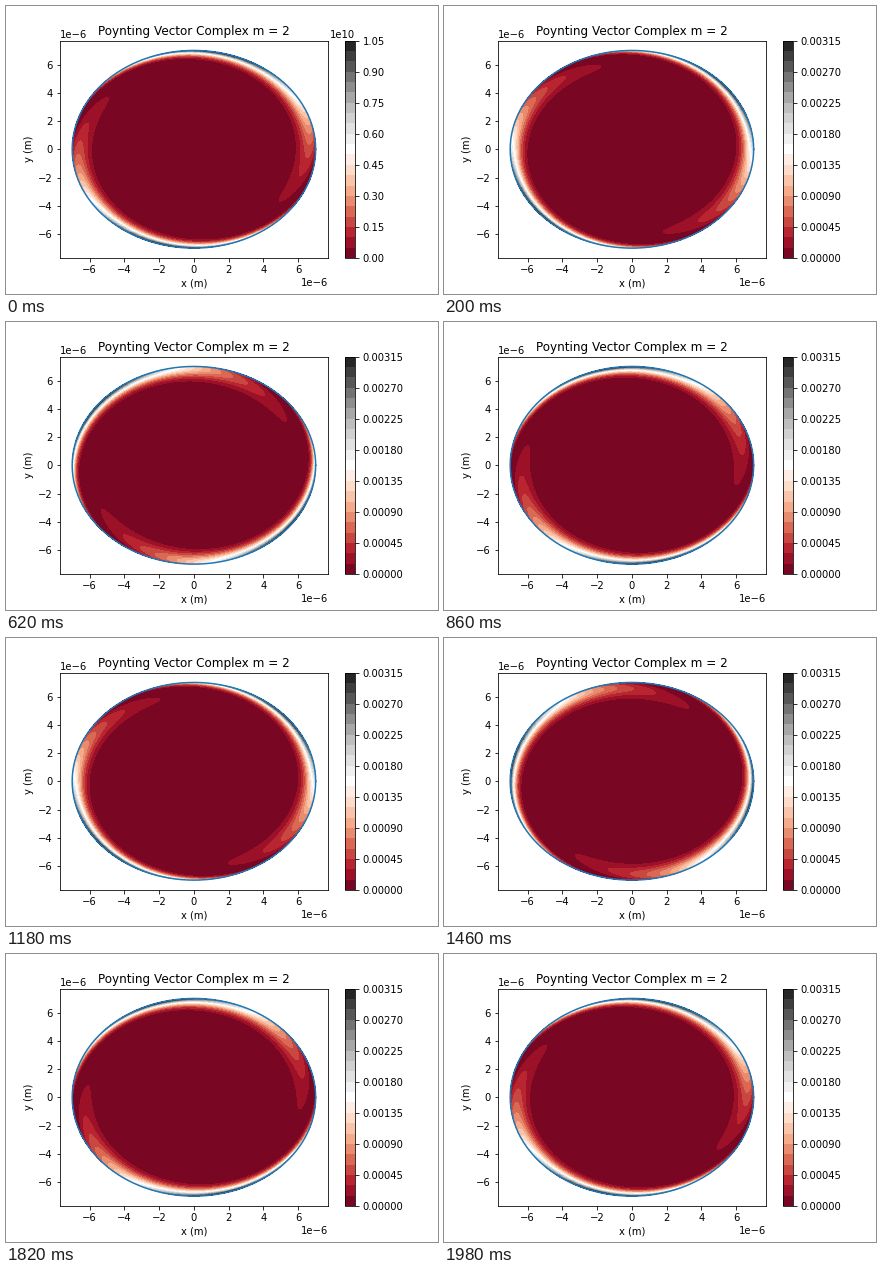
A matplotlib script that plays this animation: 432 by 288 pixels, repeating every 2 s.

```python
import numpy as np
import matplotlib.pyplot as plt
from matplotlib.animation import FuncAnimation

FRAMES, INTERVAL = 100, 20
R = 7e-6                    # cylinder radius (m)
DECAY, TWIST = 2.7e6, 1.35e6  # intensity decay and phase lag per metre of depth
PHASE = np.radians(75.3)    # angle of the rim maximum at the start
PEAK = 0.985
LEVELS = np.linspace(0, 1, 22)

plt.rcParams.update({"font.family": "DejaVu Sans", "font.size": 10})

phi = np.linspace(0, 2 * np.pi, 241)
r = np.append(0, np.linspace(4.5e-6, R, 100))
P, RR = np.meshgrid(phi, r)
X, Y = RR * np.cos(P), RR * np.sin(P)
depth = R - RR

fig = plt.figure(figsize=(6, 4), dpi=72, facecolor="white")
ax = fig.add_axes([0.125, 0.125, 0.62, 0.755])


def field(i):
    turn = 2 * np.pi * i / (FRAMES - 1)
    wave = np.cos(P - PHASE + turn + TWIST * depth)
    return PEAK * np.exp(-DECAY * depth) * wave ** 2


def draw_field(i, scale=1.0):
    return ax.contourf(X, Y, scale * field(i), levels=scale * LEVELS, cmap="RdGy")


def make_bar(scale):
    cax = fig.add_axes([0.78375, 0.125, 0.02516, 0.755])
    cs = draw_field(0, scale)
    fig.colorbar(cs, cax=cax, ticks=scale * LEVELS[::3])
    cax.minorticks_off()
    cs.remove()
    return cax


first_bar, main_bar = make_bar(1.05e10), make_bar(0.00315)

ax.plot(R * np.cos(phi), R * np.sin(phi), color="C0", lw=1.5)
ax.set(xlim=(-1.1 * R, 1.1 * R), ylim=(-1.1 * R, 1.1 * R),
       xlabel="x (m)", ylabel="y (m)")
ax.set_title("Poynting Vector Complex m = 2", y=1.0)

current = []


def update(i):
    while current:
        current.pop().remove()
    current.append(draw_field(i))
    ax.set(xlim=(-1.1 * R, 1.1 * R), ylim=(-1.1 * R, 1.1 * R))
    first_bar.set_visible(i == 0)
    main_bar.set_visible(i > 0)
    return current


anim = FuncAnimation(fig, update, frames=FRAMES, interval=INTERVAL,
                     init_func=lambda: [], repeat=True, repeat_delay=0)
plt.show()
```
